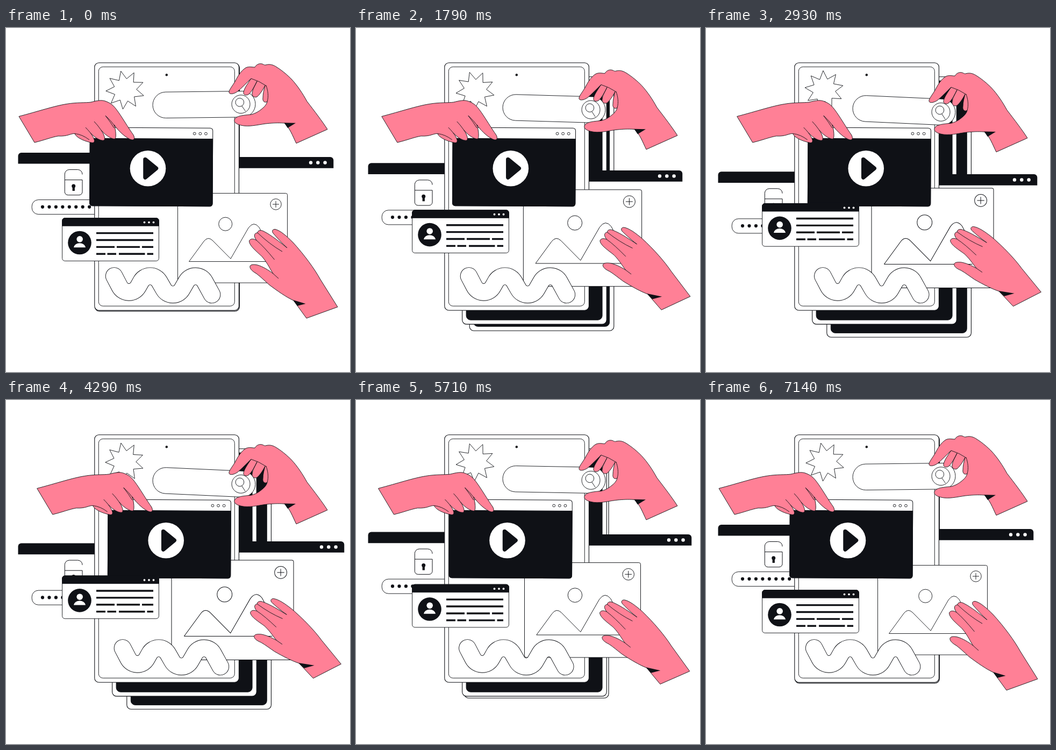
Animation, 640 px wide and 640 px high, one loop 7210 ms. Source, as an HTML page with a canvas:

```html
<!DOCTYPE html>
<html lang="en">
<head>
<meta charset="utf-8">
<title>Hands arranging windows</title>
<style>
html, body { margin: 0; width: 100%; height: 100%; overflow: hidden; background: #fff; }
canvas { display: block; width: 100%; height: 100%; }
</style>
</head>
<body>
<canvas id="stage"></canvas>
<script>
const LOOP = 7210, STEPS = 101;
const INK = '#0f1116', PAPER = '#fff', PINK = '#ff8096';
const canvas = document.getElementById('stage');
const ctx = canvas.getContext('2d');

const LEFT_HAND = {
  outline: new Path2D('M24 164.5C60 155 90 145 112 141.5C132 138 148 139.5 158 138C168 135.5 178 133 186 136.5' +
    'C190 138 194 140 197 142.5C207 150 221 176 237 199C240 205 239 208.5 234 208C225 206 210 193 201 180' +
    'C205 192 205 204 203 206C199 208 186 201 177 190C184 200 185 208 182 209C176 210 166 205 157 195' +
    'C165 206 167 213 161 213.5C150 212 131 205 128 196.5C120 196 115 202 97 201C85 203 70 209 53 213Z'),
  creases: new Path2D('M185 163Q195 172 203 183M185 163Q195 176 201 186M177 190Q170 180 164 174M157 195Q152 189 148 185M128 196.5Q142 198 155 208')
};
const TOP_HAND = {
  outline: new Path2D('M598 188.5L540 214.5C533 200 528 186 518 177C505 176 495 177 488 177.5C472 179 458 183.5 443 182' +
    'C428 180 424 175 425 171C427 164 438 162.5 456 161C468 158 474 152 479 148C483 144 485 141 486 137' +
    'C481 140 477 136 478 130C478 122 480 115 482 107C478 115 472 124 467 128C462 130 457 127 458 121' +
    'C459 113 464 106 467 99C463 107 458 117 452 123C446 127 441 124 442 119C444 111 450 103 456 94' +
    'C448 102 438 112 431 118C424 123 416 124 415 120C414 116 422 107 427 98C432 88 438 79 446 74' +
    'C452 71 458 73 463 73C465 69 470 66 474 66.5C479 66.5 480 70 484 68.5C492 66.5 498 69 504 73' +
    'C515 80 524 88 531 95C543 108 552 122 560 136.5C575 156 588 173 598 188.5Z'),
  creases: new Path2D('M456 94Q470 98 485 108M486 137C489 127 487 115 484 107.5')
};
// Drawn around the tip of its uppermost finger.
const LOW_HAND = {
  outline: new Path2D('M617 519L559 540L535 507C522 501 506 490 490 478C482 471 474 463 466 457C457 452 453 447 454 443' +
    'C456 439 463 440 468 441C478 444 488 450 497 457C492 450 487 438 477 426C468 417 452 405 452.5 396' +
    'C455 391 461 392 466 395C460 387 462 381 468 381C468 377 473 375 479 378C495 386 510 399 523 409' +
    'C513 400 504 390 498 383C494 379 495 374 501 374.5C511 377 523 388 534 399C555 422 574 448 585 468Z'),
  creases: new Path2D('M497 457L507 466M466 395Q480 407 499.5 431M468 381Q490 402 514 416')
};

const clamp = v => Math.min(1, Math.max(0, v));
const ease = (k, from, to) => { const t = clamp((k - from) / (to - from)); return t * t * (3 - 2 * t); };

// Each key is [step, ...values].
const WINDOW_KEYS = [[0, 0, 0], [15, -1, 14.5], [25, -2, 25], [41, 7, 32], [60, 20, 23], [67, 22.5, 18], [80, 15, 10], [100, 0, 0]];
const STAR_KEYS = [[0, 0, 0, 0], [15, 1, 1, -52], [25, 0, 1.5, -84], [41, -2, 0, -150], [60, -1, 0, -198], [80, 0, .5, -284], [100, 0, 0, -360]];

function spline(keys, k) {
  let i = 0;
  while (i < keys.length - 2 && k >= keys[i + 1][0]) i++;
  const a = keys[i], b = keys[i + 1], p = keys[i - 1] || a, n = keys[i + 2] || b;
  const h = b[0] - a[0], t = (k - a[0]) / h, t2 = t * t, t3 = t2 * t;
  return a.slice(1).map((v, j) => {
    const c = j + 1;
    const ma = (b[c] - p[c]) / (b[0] - p[0]) * h;
    const mb = (n[c] - a[c]) / (n[0] - a[0]) * h;
    return v * (2 * t3 - 3 * t2 + 1) + ma * (t3 - 2 * t2 + t) + b[c] * (3 * t2 - 2 * t3) + mb * (t3 - t2);
  });
}

function paint(fill, line, path) {
  if (fill) { ctx.fillStyle = fill; path ? ctx.fill(path) : ctx.fill(); }
  if (line) { ctx.lineWidth = line; path ? ctx.stroke(path) : ctx.stroke(); }
}
function box(x, y, w, h, r, fill, line) {
  ctx.beginPath();
  ctx.roundRect(x, y, w, h, r);
  paint(fill, line);
}
function disc(x, y, r, fill, line) {
  ctx.beginPath();
  ctx.arc(x, y, r, 0, Math.PI * 2);
  paint(fill, line);
}
function poly(points, fill, line) {
  ctx.beginPath();
  points.forEach(([x, y]) => ctx.lineTo(x, y));
  if (fill) ctx.closePath();
  paint(fill, line);
}
function discRow(x, y, step, count, r, fill, line) {
  for (let i = 0; i < count; i++) disc(x + i * step, y, r, fill, line);
}
function at(x, y, draw, angle = 0, scale = 1) {
  ctx.save();
  ctx.translate(x, y);
  ctx.rotate(angle * Math.PI / 180);
  ctx.scale(scale, scale);
  draw();
  ctx.restore();
}
function hand(shape) {
  paint(PINK, .9, shape.outline);
  paint(null, .9, shape.creases);
}

function page(dx, dy, inner) {
  box(164.8 + dx, 64.8 + dy, 268.6, 460.4, 8, PAPER, 1.1);
  box(172.3 + dx, 72.3 + dy, 253, 445, 8, inner, .9);
}

function star(x, y, turn) {
  const points = [];
  for (let i = 0; i < 18; i++) {
    const a = (turn - 103 + i * 20) * Math.PI / 180, r = i % 2 ? 21 : 36;
    points.push([x + r * Math.cos(a), y + r * Math.sin(a)]);
  }
  poly(points, PAPER, .9);
}

function rightWindow(dx, dy) {
  at(dx, dy, () => {
    box(413, 250, 196, 150, 0, PAPER);
    box(413, 240, 196.3, 20.8, [6, 6, 0, 0], INK);
    discRow(567, 250.5, 13.3, 3, 3.2, PAPER);
  });
}

function lock() {
  ctx.beginPath();
  ctx.moveTo(142, 272.5);
  ctx.arcTo(142, 263.5, 133, 263.5, 8.5);
  ctx.arcTo(109.3, 263.5, 109.3, 275, 8.5);
  ctx.arcTo(109.3, 310.8, 120, 310.8, 6);
  ctx.arcTo(142, 310.8, 142, 300, 6);
  ctx.lineTo(142, 282.6);
  ctx.lineTo(109.3, 282.6);
  paint(null, 1);
  disc(125.7, 294, 3.5, INK);
  box(123.6, 295, 4.3, 8, 0, INK);
}

function passwordField() {
  box(48.2, 319.6, 150, 27, 12, PAPER, .9);
  discRow(68, 332.8, 12.45, 8, 3.1, INK);
}

function pictureCard(scale) {
  at(421.5, 390.8, () => {
    ctx.translate(-421.5, -390.8);
    box(319.5, 307.5, 204, 166.6, 3, PAPER, .9);
    disc(408.2, 364.7, 12.5, null, .9);
    disc(502, 328, 10.2, null, .9);
    poly([[496, 328], [508, 328]], null, .9);
    poly([[502, 322], [502, 334]], null, .9);
    ctx.beginPath();
    ctx.moveTo(340.5, 434.5);
    ctx.lineTo(368, 397);
    ctx.quadraticCurveTo(375.5, 387, 384, 395);
    ctx.lineTo(418, 429.3);
    ctx.lineTo(451, 372);
    ctx.quadraticCurveTo(461, 358, 471, 371);
    ctx.lineTo(484, 396);
    ctx.moveTo(340.5, 434.5);
    ctx.lineTo(488, 434.5);
    paint(null, .9);
  }, 0, scale);
}

function wave() {
  const end = [383, 496];
  ctx.beginPath();
  ctx.moveTo(201.2, 461.5);
  [[228, 512.7], [268, 442], [310.5, 515.5], [353, 441.5]].forEach((p, i, all) => {
    ctx.arcTo(...p, ...(all[i + 1] || end), 19.5);
  });
  ctx.lineTo(...end);
  ctx.save();
  ctx.lineCap = 'round';
  paint(null, 32.6);
  ctx.strokeStyle = PAPER;
  paint(null, 30.8);
  ctx.restore();
}

function searchField(u) {
  const left = 143.3 + 6.6 * u, right = 141.7 + 14.6 * u;
  const angle = Math.atan2(right - left, 140) * 180 / Math.PI;
  at(297, left, () => box(-24, -24.2, 191, 48.4, 24.2, PAPER, .9), angle);
  at(437, right, () => {
    disc(0, 0, 17, PAPER, .9);
    disc(-2.2, -3.4, 7.8, null, .9);
    poly([[1.8, 3.4], [8.5, 13]], null, .9);
  }, 2 * u);
}

function videoWindow() {
  at(270.2, 258.4, () => {
    box(-114.2, -72.8, 228.4, 145.6, 5, PAPER, 1);
    box(-114.2, -52.5, 228.4, 125.3, [0, 0, 5, 5], INK, 1);
    discRow(80.2, -62.3, 10.6, 3, 2.4, null, .9);
  }, .3);
  disc(264, 261.2, 33.3, PAPER);
  ctx.save();
  ctx.lineJoin = 'round';
  poly([[259, 244.5], [279.5, 261.2], [259, 278]], INK, 7.5);
  ctx.restore();
}

function profileCard() {
  box(104.6, 353.6, 179.8, 79.8, 5, PAPER, .9);
  box(104.6, 353.6, 179.8, 14.6, [5, 5, 0, 0], INK, .9);
  discRow(257.5, 361.6, 8.5, 3, 1.9, PAPER);
  disc(137, 399.5, 21.8, INK);
  disc(137.2, 392.8, 5.8, PAPER);
  ctx.beginPath();
  ctx.moveTo(126, 408.2);
  ctx.bezierCurveTo(128, 397.5, 146, 397.5, 148, 408.2);
  paint(PAPER);
  const rows = [[[168, 274]], [[168, 274]], [[168, 202], [206, 249], [253, 274]], [[168, 185], [188.5, 205], [210, 258.5], [262.5, 274]]];
  rows.forEach((row, i) => row.forEach(([a, b]) => box(a, 379.9 + i * 12.9, b - a, 3.4, 0, INK)));
}

function draw(k) {
  const mirror = k <= 50 ? k : 100 - k;
  const reach = ease(mirror, 0, 39);
  const drift = ease(mirror, 0, 50);
  const near = ease(mirror, 0, 16), far = ease(mirror, 15.5, 34.5);
  const nearX = .8 + 32 * near, nearY = 1.5 + 24.4 * near;

  page(nearX + 27.2 * far, nearY + 24.2 * far, INK);
  page(nearX, nearY, INK);
  rightWindow(...spline(WINDOW_KEYS, k));

  at(0, 38.6 * drift, () => {
    box(22.5, 232, 160, 20.6, [6, 0, 0, 0], INK);
    lock();
    passwordField();
  });

  page(0, 0, PAPER);
  disc(298.8, 87.3, 2.2, INK);
  const [sx, sy, turn] = spline(STAR_KEYS, k);
  star(221.8 + sx, 115.3 + sy, turn);

  pictureCard(1 + .113 * reach);
  at(17.7 * drift, 0, wave);
  searchField(reach);
  at(33.7 * reach, 0, () => {
    videoWindow();
    hand(LEFT_HAND);
  });
  at(0, -29.7 * drift, profileCard);

  at(0, 16.2 * reach, () => {
    hand(TOP_HAND);
    poly([[517.5, 176.3], [539, 176.8], [524, 186]], INK);
  });
  at(496 - 3 * reach, 376 - 4.5 * reach, () => {
    ctx.translate(-496, -376);
    hand(LOW_HAND);
    poly([[534, 506], [557.5 + 7 * reach, 513 + 2 * reach], [542 + 2 * reach, 517 + reach]], INK);
  }, -7.2 * reach, 1 - .055 * reach);
}

function frame(now) {
  const ratio = window.devicePixelRatio || 1;
  const w = Math.round(innerWidth * ratio), h = Math.round(innerHeight * ratio);
  if (canvas.width !== w || canvas.height !== h) {
    canvas.width = w;
    canvas.height = h;
  }
  const scale = Math.min(w, h) / 640;
  ctx.setTransform(1, 0, 0, 1, 0, 0);
  ctx.fillStyle = PAPER;
  ctx.fillRect(0, 0, w, h);
  ctx.setTransform(scale, 0, 0, scale, (w - 640 * scale) / 2, (h - 640 * scale) / 2);
  ctx.strokeStyle = INK;
  draw(Math.min(STEPS - 1, Math.floor((now % LOOP) / LOOP * STEPS + .1)));
  requestAnimationFrame(frame);
}
requestAnimationFrame(frame);
</script>
</body>
</html>
```
